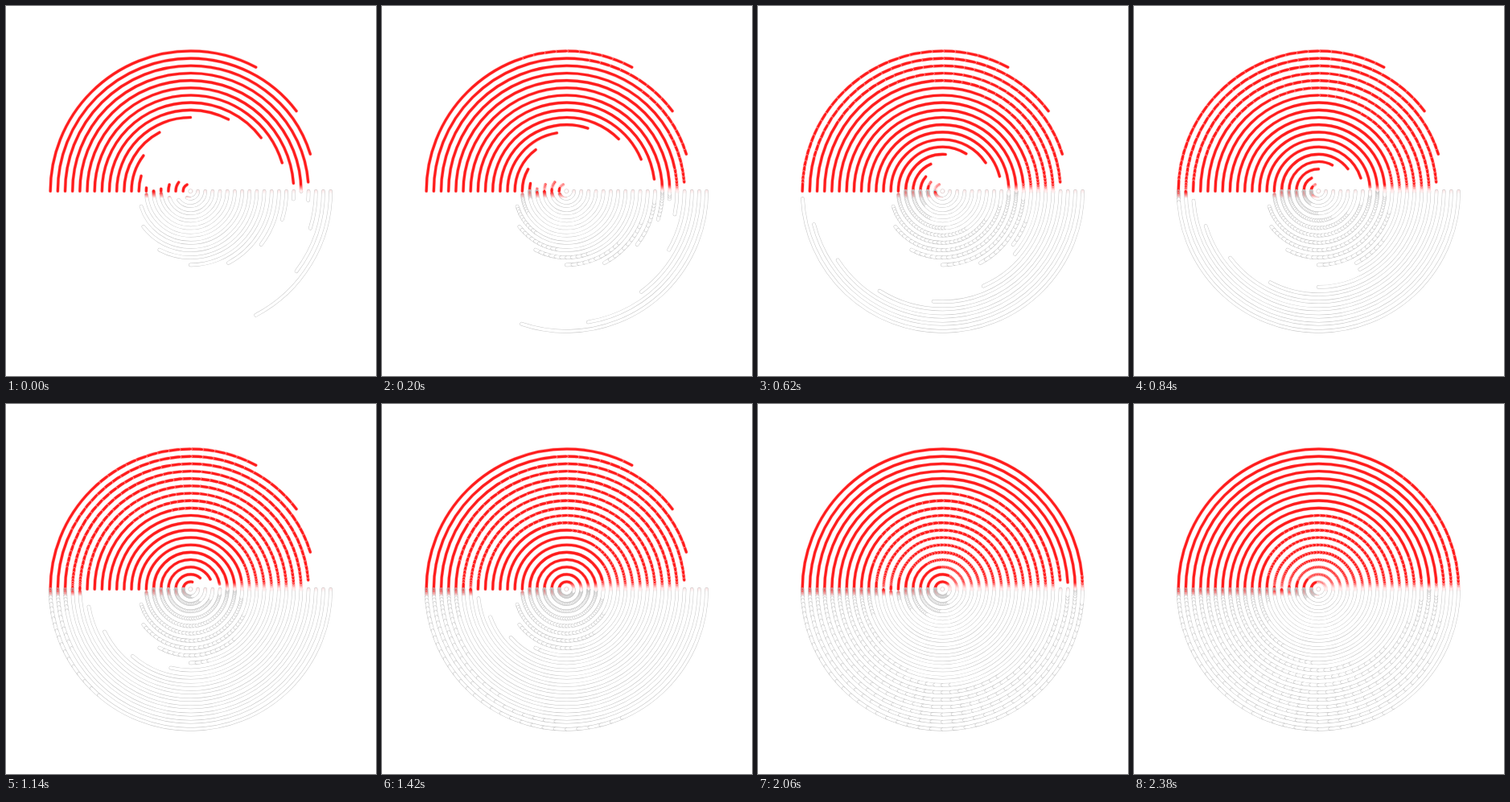
An HTML page with a canvas for the animation above (2400 ms loop, 460 px wide and 460 px high).

```html
<!DOCTYPE html>
<html lang="en">
<head>
<meta charset="utf-8">
<title>Swinging rings</title>
<style>
  html, body { margin: 0; width: 100%; height: 100%; overflow: hidden; background: #fff; }
  canvas { display: block; width: 460px; height: 460px; }
</style>
</head>
<body>
<canvas id="stage" width="460" height="460"></canvas>
<script>
const ctx = document.getElementById('stage').getContext('2d');
const LOOP = 2400, STEP = 20, STEPS = LOOP / STEP;
const CX = 229.4, CY = 230.2, MID = 230;
const RINGS = 19, GAP = 9.17;
const HELD = [55, 82];
const RED = '#ff1c1c', GREY = '#c6c6c6';
const HALF = Math.PI / 2;

// Vertical colour change, placed differently on each side of the centre.
function fade(stops) {
  const g = ctx.createLinearGradient(0, 0, 0, 460);
  stops.forEach(([y, color]) => g.addColorStop(y / 460, color));
  return g;
}
const sides = [
  { x: 0, ink: fade([[231, RED], [239, '#fff']]) },
  { x: MID, ink: fade([[222, RED], [229, '#ffe6e6'], [234, '#fff']]) }
];

// Swing of a ring's tip, measured from straight up.
const swing = (ring, step) =>
  HALF * Math.sin((ring - 10) * Math.PI / 10 + 2 * Math.PI * step / STEPS);

// Strokes stay once painted: find how far a tip has reached in one
// direction, and the cap edges it has left behind while retreating.
function reach(ring, step, sign) {
  let far = sign * swing(ring, step);
  const caps = [];
  for (let k = step - 1; k >= 0; k--) {
    const a = sign * swing(ring, k);
    if (a > far + 1e-6) {
      caps.push(far);
      far = a;
    }
  }
  return { far, caps };
}

function arc(r, from, to, width, style) {
  ctx.beginPath();
  ctx.arc(CX, CY, r, from, Math.max(to, from + 0.002));
  ctx.lineWidth = width;
  ctx.strokeStyle = style;
  ctx.stroke();
}

function cap(r, angle, style) {
  ctx.beginPath();
  ctx.arc(CX + r * Math.cos(angle), CY + r * Math.sin(angle), 2, angle, angle + Math.PI);
  ctx.lineWidth = 0.7;
  ctx.strokeStyle = style;
  ctx.stroke();
}

function drawRing(r, red, white, ink) {
  const redEnd = 2 * Math.PI - HALF + red.far;
  const whiteEnd = HALF + white.far;
  arc(r, 0, whiteEnd, 4.6, GREY);
  arc(r, Math.PI, redEnd, 4.2, '#ffb4b4');
  arc(r, 0, whiteEnd, 3.6, ink);
  arc(r, Math.PI, redEnd, 3.1, ink);
  white.caps.forEach(a => cap(r, HALF + a, GREY));
  red.caps.forEach(a => cap(r, 2 * Math.PI - HALF + a, 'rgba(255,235,235,.7)'));
}

function paint(step) {
  ctx.fillStyle = '#fff';
  ctx.fillRect(0, 0, 460, 460);
  ctx.lineCap = 'round';
  const rings = [];
  for (let i = 1; i <= RINGS; i++) {
    rings.push([i * GAP, reach(i, step, 1), reach(i, step, -1)]);
  }
  for (const { x, ink } of sides) {
    ctx.save();
    ctx.beginPath();
    ctx.rect(x, 0, MID, 460);
    ctx.clip();
    rings.forEach(([r, red, white]) => drawRing(r, red, white, ink));
    ctx.restore();
  }
  ctx.beginPath();
  ctx.arc(CX, CY, 2.6, 0, 2 * Math.PI);
  ctx.lineWidth = 0.7;
  ctx.strokeStyle = '#dcc4c4';
  ctx.stroke();
}

const start = performance.now();
let shown = -1;
function tick() {
  const t = Math.max(0, performance.now() - start) % LOOP;
  let step = Math.floor(t / STEP);
  if (HELD.includes(step)) step--;
  if (step !== shown) paint(shown = step);
  requestAnimationFrame(tick);
}
tick();
</script>
</body>
</html>
```
